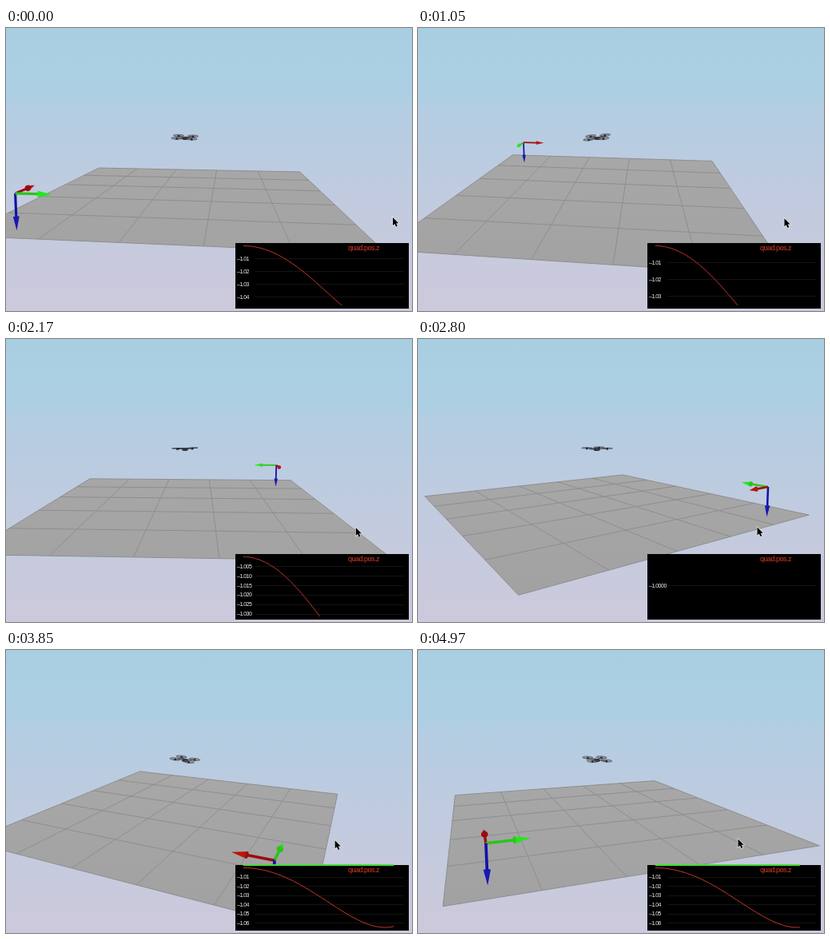
These frames come from a looping animation (508 by 354 pixels, 5.04 s). An HTML page with a canvas:

```html
<!DOCTYPE html>
<html lang="en">
<head>
<meta charset="utf-8">
<title>Quadcopter simulator</title>
<style>
  html, body { margin: 0; width: 100%; height: 100%; overflow: hidden; }
  canvas { display: block; }
</style>
</head>
<body>
<canvas id="stage" width="508" height="354"></canvas>
<script>
const ctx = document.getElementById('stage').getContext('2d');
const LOOP = 5040, STEP = 70;

// The camera orbits the drone at distance 1.
const FOCAL = 470, CENTER_X = 224, CENTER_Y = 137;
const GROUND = -0.152, HALF = 0.37;
const times = [0, 630, 1540, 2800, 3430, 4340, 4970];
const yawKeys = [353.5, 291.1, 231.2, 123.4, 81.2, 49.1, 19.2];
const pitchKeys = [5.1, 14.1, 7, 5, 1.8, 22.4, 8.1];
const cursorX = [484, 465.5, 451, 424.5, 415.5, 407.5, 400.5];
const cursorY = [237, 239, 237, 235.5, 236, 240.5, 236.5];

// Simulation run and plot
const RUN = 1162, RUN_START = 2798 - 3 * RUN, PLOT_SPEED = 0.179;
const PLOT = { x: 287, y: 269, w: 217, h: 82, left: 297, top: 272.5, range: 74.5 };

let cosYaw, sinYaw, cosPitch, sinPitch;

// Smooth cubic through the keys
function sample(keys, t) {
  const last = times.length - 1;
  let i = 0;
  while (i < last - 1 && t >= times[i + 1]) i++;
  const slope = k => {
    const a = Math.max(k - 1, 0), b = Math.min(k + 1, last);
    return (keys[b] - keys[a]) / (times[b] - times[a]);
  };
  const span = times[i + 1] - times[i], p = (t - times[i]) / span, q = 1 - p;
  return keys[i] * q * q * (1 + 2 * p) + keys[i + 1] * p * p * (3 - 2 * p)
    + span * p * q * (slope(i) * q - slope(i + 1) * p);
}

function setCamera(t) {
  const yaw = sample(yawKeys, t) * Math.PI / 180;
  const pitch = sample(pitchKeys, t) * Math.PI / 180;
  cosYaw = Math.cos(yaw); sinYaw = Math.sin(yaw);
  cosPitch = Math.cos(pitch); sinPitch = Math.sin(pitch);
}

function project(u, v, w) {
  const right = v * cosYaw - u * sinYaw, ahead = u * cosYaw + v * sinYaw;
  const depth = 1 + ahead * cosPitch - w * sinPitch;
  const scale = FOCAL / depth;
  return {
    x: CENTER_X + right * scale,
    y: CENTER_Y - (w * cosPitch + ahead * sinPitch) * scale,
    depth, scale
  };
}

function path(points, close) {
  ctx.beginPath();
  points.forEach(p => ctx.lineTo(p.x, p.y));
  if (close) ctx.closePath();
}

function line(a, b, color, width) {
  path([a, b]);
  ctx.strokeStyle = color;
  ctx.lineWidth = width;
  ctx.stroke();
}

function drawSky() {
  const sky = ctx.createLinearGradient(0, 0, 0, 354);
  [[0, '#a8cee2'], [0.24, '#adcfe3'], [0.28, '#b3cde2'], [0.6, '#c1cbdf'], [1, '#cdc9dc']]
    .forEach(([at, color]) => sky.addColorStop(at, color));
  ctx.fillStyle = sky;
  ctx.fillRect(0, 0, 508, 354);
}

function drawGround() {
  const shade = ctx.createLinearGradient(0, 120, 0, 354);
  shade.addColorStop(0, '#a9a9aa');
  shade.addColorStop(1, '#a0a0a0');
  const spot = (u, v) => project(u, v, GROUND);
  path([spot(-HALF, -HALF), spot(HALF, -HALF), spot(HALF, HALF), spot(-HALF, HALF)], true);
  ctx.fillStyle = shade;
  ctx.fill();
  for (let i = 0; i <= 5; i++) {
    const k = HALF * (i / 2.5 - 1);
    line(spot(k, -HALF), spot(k, HALF), '#8e8e8e', 1);
    line(spot(-HALF, k), spot(HALF, k), '#8e8e8e', 1);
  }
}

function drawAxes() {
  const anchor = [-0.303, -0.303, -0.087], length = 0.075, neck = 0.047, radius = 0.0062;
  const along = (dir, d) => project(...anchor.map((o, i) => o + dir[i] * d));
  const start = along([0, 0, 0], 0);
  [
    { dir: [1, 0, 0], shaft: '#9c0c0c', head: '#b81414' },
    { dir: [0, 1, 0], shaft: '#2cc418', head: '#24e61c' },
    { dir: [0, 0, -1], shaft: '#1212a8', head: '#1818b4' }
  ].map(axis => ({ ...axis, base: along(axis.dir, neck), tip: along(axis.dir, length) }))
    .sort((a, b) => b.tip.depth - a.tip.depth)
    .forEach(({ shaft, head, base, tip }) => {
      line(start, base, shaft, 0.005 * base.scale);
      const angle = Math.atan2(tip.y - base.y, tip.x - base.x);
      const size = radius * base.scale;
      const flat = Math.min(1, Math.abs(tip.depth - base.depth) / (length - neck));
      const dx = Math.sin(angle) * size, dy = -Math.cos(angle) * size;
      path([{ x: base.x + dx, y: base.y + dy }, tip, { x: base.x - dx, y: base.y - dy }], true);
      ctx.fillStyle = head;
      ctx.fill();
      ctx.beginPath();
      ctx.ellipse(base.x, base.y, size * flat, size, angle, 0, 7);
      ctx.fillStyle = tip.depth > base.depth ? shaft : head;
      ctx.fill();
    });
}

function drawDrone(phase) {
  const tilt = Math.min(1, phase / 600), arm = 0.0196, blade = 0.0142;
  const spot = (u, v, w = 0) => project(u, v, w + tilt * (0.1 * u - 0.03 * v));
  const rotors = [[1, 1], [1, -1], [-1, 1], [-1, -1]].map(([a, b]) => [a * arm, b * arm]);
  rotors.forEach(([u, v]) => line(spot(0, 0), spot(u, v), '#4a4a50', 1.2));
  line(spot(0, 0), spot(0.02, 0), '#a8483c', 1);
  const body = spot(0, 0, -0.002);
  ctx.fillStyle = '#35353c';
  ctx.beginPath();
  ctx.ellipse(body.x, body.y, 4, 2, 0, 0, 7);
  ctx.fill();
  rotors.forEach(([u, v]) => {
    const rim = [];
    for (let a = 0; a < 6.28; a += 0.3) {
      rim.push(spot(u + blade * Math.cos(a), v + blade * Math.sin(a), 0.001));
    }
    path(rim, true);
    ctx.fillStyle = 'rgba(105,105,112,.5)';
    ctx.fill();
    ctx.strokeStyle = 'rgba(60,60,66,.8)';
    ctx.lineWidth = 0.8;
    ctx.stroke();
    const hub = spot(u, v);
    ctx.fillStyle = '#26262c';
    ctx.fillRect(hub.x - 1.2, hub.y - 1, 2.4, 2.4);
  });
}

function text(label, x, y, size, color) {
  ctx.font = size + 'px "Liberation Sans", sans-serif';
  ctx.letterSpacing = '-0.5px';
  ctx.fillStyle = color;
  ctx.fillText(label, x, y);
}

// Altitude lost after s pixels of plot time
const drop = s => s * s * (3.87 - 1.82 * (s / 178) ** 2.3) * 1e-6;

function tickStep(range) {
  const unit = 10 ** Math.floor(Math.log10(range / 7));
  return [1, 2, 5, 10].map(n => n * unit).find(step => range / step < 7);
}

function drawTick(y, value, digits) {
  ctx.fillStyle = '#161414';
  ctx.fillRect(312, Math.round(y), 186, 1);
  text('–' + value.toFixed(digits), 289, y + 2.5, 7, '#f0f0f0');
}

function drawPlot(phase) {
  const width = Math.min(phase * PLOT_SPEED, 194);
  ctx.fillStyle = '#000';
  ctx.fillRect(PLOT.x, PLOT.y, PLOT.w, PLOT.h);
  if (width < 2) {
    drawTick(308, 1, 4);
  } else {
    const deepest = drop(Math.min(width, 177));
    const step = tickStep(deepest);
    const digits = Math.max(2, Math.ceil(-Math.log10(step) - 1e-6));
    const toY = d => PLOT.top + PLOT.range * d / deepest;
    for (let i = 1; i * step <= deepest; i++) drawTick(toY(i * step), 1 + i * step, digits);
    const curve = [];
    for (let i = 0; i <= 80; i++) {
      const s = width * i / 80;
      curve.push({ x: PLOT.left + s, y: toY(drop(s)) });
    }
    path(curve);
    ctx.strokeStyle = '#c8382c';
    ctx.lineWidth = 1;
    ctx.stroke();
  }
  text('quad.pos.z', 428, 278, 9, '#d83a2a');
  if (phase > 862) {
    ctx.fillStyle = '#46dc3c';
    ctx.fillRect(PLOT.left, 268, width, 2);
  }
}

function drawCursor(t) {
  ctx.save();
  ctx.translate(sample(cursorX, t), sample(cursorY, t));
  ctx.beginPath();
  [[0, 0], [0, 10], [2.3, 7.9], [4, 11.6], [5.8, 10.8], [4.2, 7.2], [7.2, 7.2]]
    .forEach(([x, y]) => ctx.lineTo(x, y));
  ctx.closePath();
  ctx.strokeStyle = '#e8e8e8';
  ctx.lineWidth = 1.4;
  ctx.stroke();
  ctx.fillStyle = '#000';
  ctx.fill();
  ctx.restore();
}

function draw(now) {
  const t = Math.floor(now % LOOP / STEP) * STEP;
  const phase = (t - RUN_START) % RUN;
  setCamera(t);
  drawSky();
  drawGround();
  drawAxes();
  drawDrone(phase);
  drawPlot(phase);
  drawCursor(t);
}

const begin = performance.now();
(function tick() {
  draw(performance.now() - begin);
  requestAnimationFrame(tick);
})();
</script>
</body>
</html>
```
